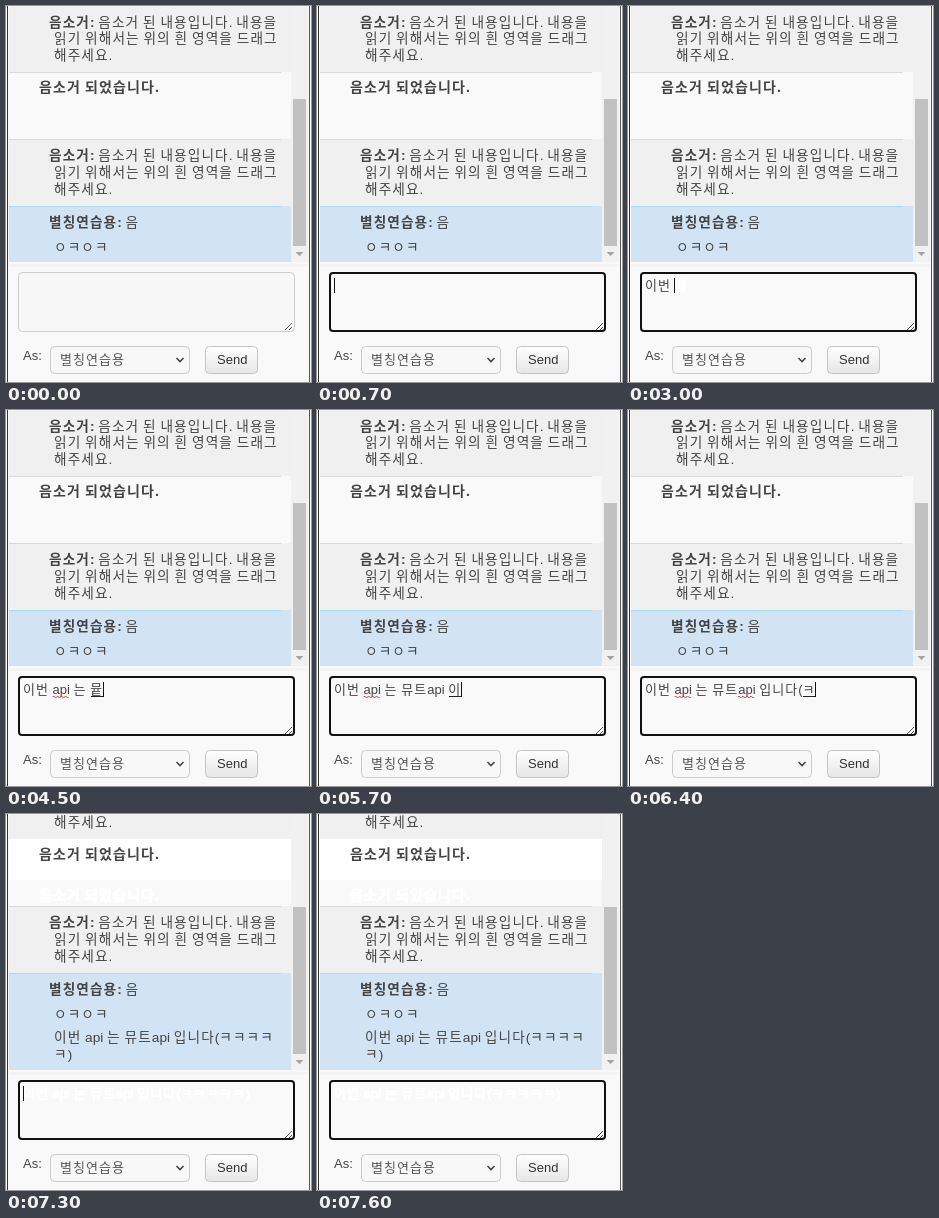
Animation of 305 by 376 pixels, one loop 8000 ms. Source, as an HTML page:

```html
<!DOCTYPE html>
<html lang="ko">
<head>
<meta charset="utf-8">
<style>
html, body { margin: 0; width: 100%; height: 100%; overflow: hidden; background: #fff; }
svg { display: block; width: 305px; height: 376px; }
text { font-family: "Liberation Sans", "Noto Sans CJK KR", sans-serif; white-space: pre; }
.hangul { font-family: "Noto Sans CJK KR", sans-serif; letter-spacing: .08em; }
.bold { font-weight: 700; }
</style>
</head>
<body>
<svg id="stage" viewBox="0 0 305 376"></svg>
<script>
const LOOP = 8000, FOCUS = 700, SENT = 7300;
const USER = "별칭연습용";
const OPENING = "이번 api 는 뮤트api 입니다(";
const MESSAGE = OPENING + "ㅋㅋㅋㅋㅋ)";
const INPUT_X = 17, INPUT_SIZE = 13, CHAT_SIZE = 13.65;
const LINE = 16.8;

// [time, committed text, syllable being composed]
const typing = [
  [0, "", ""], [FOCUS, "", ""],
  [1300, "", "ㅇ"], [2000, "", "이"], [2100, "", "입"], [2200, "이", "버"], [2300, "이", "번"],
  [2600, "이번 ", "메"], [3000, "이번 ", ""], [3200, "이번 ap", ""], [3600, "이번 api", ""],
  [3900, "이번 api ", ""], [4000, "이번 api ", "ㄴ"], [4100, "이번 api ", "느"],
  [4200, "이번 api ", "는"], [4300, "이번 api 는 ", ""], [4400, "이번 api 는 ", "뮤"],
  [4500, "이번 api 는 ", "뮽"], [4600, "이번 api 는 뮤", "트"],
  [4900, "이번 api 는 뮤트", ""], [5000, "이번 api 는 뮤트a", ""],
  [5100, "이번 api 는 뮤트ap", ""], [5300, "이번 api 는 뮤트api", ""],
  [5600, "이번 api 는 뮤트api ", ""], [5700, "이번 api 는 뮤트api ", "이"],
  [5800, "이번 api 는 뮤트api ", "입"], [5900, "이번 api 는 뮤트api 입", "니"],
  [6000, "이번 api 는 뮤트api 입니", "다"], [6200, OPENING, ""],
  [6400, OPENING, "ㅋ"], [6500, OPENING + "ㅋ", "ㅋ"],
  [6700, OPENING + "ㅋㅋ", "ㅋ"], [6800, OPENING + "ㅋㅋㅋ", "ㅋ"],
  [7000, OPENING + "ㅋㅋㅋㅋ", "ㅋ"], [7100, MESSAGE, ""], [SENT, "", ""]
];

const advance = { a: .556, p: .556, i: .222, " ": .278, "(": .333, ")": .333 };
const width = s => [...s].reduce((sum, c) => sum + (advance[c] ?? 1), 0) * INPUT_SIZE;

const rect = (x, y, w, h, fill, extra = "") =>
  `<rect x="${x}" y="${y}" width="${w}" height="${h}" fill="${fill}" ${extra}/>`;

const hangul = s => s.replace(/[\u3130-\u318f\uac00-\ud7a3]+/g,
  run => `<tspan class="hangul">${run}</tspan>`);

const text = (s, x, y, size, fill = "#444", extra = "") =>
  `<text x="${x}" y="${y}" font-size="${size}" fill="${fill}" ${extra}>${hangul(s)}</text>`;

const ghost = 'stroke="#fff" stroke-width=".8"';

const named = (name, first, y) =>
  text(`<tspan class="bold">${name}:</tspan> ${first}`, 43, y, CHAT_SIZE);

const muted = y => named("음소거", "음소거 된 내용입니다. 내용을", y)
  + text("읽기 위해서는 위의 흰 영역을 드래그", 48, y + LINE, CHAT_SIZE)
  + text("해주세요.", 48, y + 2 * LINE, CHAT_SIZE);

const notice = (y, fill, extra = "") =>
  text("음소거 되었습니다.", 33, y, 14, fill, `class="bold" ${extra}`);

function chat(sent) {
  const dy = sent ? -41 : 0;
  let out = rect(3, 0, 282, 66 + dy, "#f0f0f0") + rect(3, 66 + dy, 272, 1, "#dcdcdc")
    + muted(20.5 + dy);
  if (sent) out += rect(3, 25, 282, 41, "#fff") + notice(86, "#fff", ghost);
  out += notice(86 + dy, "#444")
    + rect(3, 133 + dy, 282, 67, "#f0f0f0") + rect(3, 133 + dy, 272, 1, "#d8d8d8")
    + muted(154.3 + dy)
    + rect(3, 200 + dy, 282, 56 - dy, "#d2e4f4") + rect(3, 200 + dy, 272, 1, "#a8dafa")
    + named(USER, "음", 221 + dy)
    + text("ㅇㅋㅇㅋ", 48, 246 + dy, CHAT_SIZE);
  if (sent) out += text(OPENING + "ㅋㅋㅋㅋ", 48, 228.3, CHAT_SIZE)
    + text("ㅋ)", 48, 245.3, CHAT_SIZE);
  return out;
}

const scrollbar = rect(285, 0, 17, 256, "#f1f1f1") + rect(287, 93, 13, 147, "#c1c1c1")
  + '<path d="M289.5 246h8l-4 4z" fill="#a3a3a3"/>';

const buttonFill = '<linearGradient id="button" x2="0" y2="1"><stop stop-color="#fff"/>'
  + '<stop offset="1" stop-color="#e6e6e6"/></linearGradient>';

const controls = buttonFill + text("As:", 17, 354, 13)
  + rect(44.5, 340.5, 139, 27, "#f8f8f8", 'rx="4" stroke="#ccc"')
  + text(USER, 54, 358, 13, "#555")
  + '<path d="M170.5 352l3.5 3.5 3.5-3.5" fill="none" stroke="#444" stroke-width="1.6"/>'
  + rect(199.5, 340.5, 52, 27, "url(#button)", 'rx="4" stroke="#c4c4c4"')
  + text("Send", 211, 358, 13, "#333");

const wiggle = x =>
  `<path d="M${x} 287${"q1-2 2 0t2 0".repeat(4)}" fill="none" stroke="#f03030"/>`;

function input(t, committed, composing, caretOn) {
  let out = t >= FOCUS
    ? rect(13, 267, 275, 58, "#f9f9f9", 'rx="3" stroke="#101010" stroke-width="2"')
    : rect(12.5, 266.5, 276, 59, "#f7f7f7", 'rx="4" stroke="#ccc"');
  out += '<path d="M279 324l7-7M283 324l3-3" stroke="#555"/>';
  if (t >= SENT) out += text(MESSAGE, INPUT_X, 284, INPUT_SIZE, "#fff", ghost);
  if (t >= 3000 && t < 3200) out += text("메", INPUT_X + width("이번 "), 284, INPUT_SIZE, "#fff", ghost);

  const start = INPUT_X + width(committed), end = start + width(composing);
  out += text(committed + composing, INPUT_X, 284, INPUT_SIZE);
  if (t >= 3900 && t < SENT) out += wiggle(INPUT_X + width("이번 "));
  if (t >= 5800 && t < SENT) out += wiggle(INPUT_X + width("이번 api 는 뮤트"));
  if (composing) out += rect(Math.round(start) + 1, 286, 12, 1, "#222");
  if (caretOn) out += rect(Math.floor(end), 272, 1, 15, "#111");
  return out;
}

const stage = document.getElementById("stage");
let shown = "";

function frame(now) {
  const t = now % LOOP;
  const [since, committed, composing] = typing.findLast(step => step[0] <= t);
  const caretOn = t >= FOCUS && t - since < (since === SENT ? 300 : 500);
  const key = [since, caretOn, t >= 5800].join();
  if (key !== shown) {
    shown = key;
    stage.innerHTML = rect(2, 0, 301, 376, "#f9f9f9")
      + chat(t >= SENT) + scrollbar + rect(3, 258, 299, 3, "#f4f4f4")
      + input(t, committed, composing, caretOn) + controls
      + rect(1, 0, 1, 376, "#333") + rect(303, 0, 1, 376, "#555");
  }
  requestAnimationFrame(frame);
}
frame(performance.now());
</script>
</body>
</html>
```
